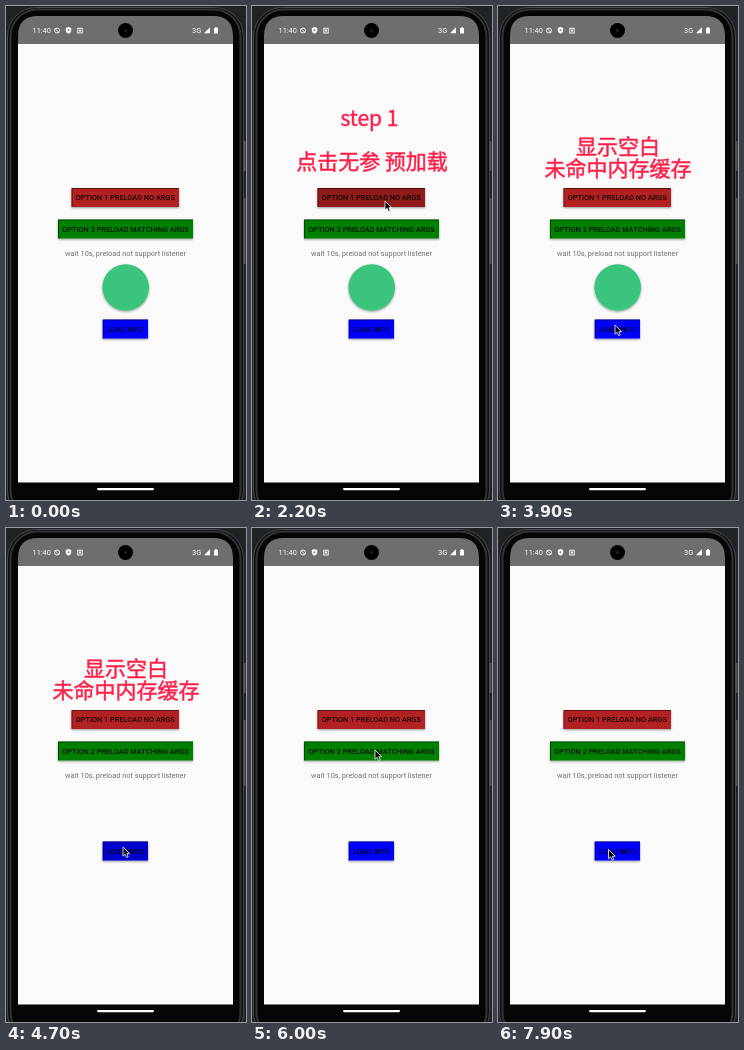
Recreate the animation shown at these times as an HTML page. Size 240 by 494 pixels, loop 8 s.

```html
<!DOCTYPE html>
<html lang="zh-CN">
<meta charset="utf-8">
<style>
html, body { margin: 0; width: 100%; height: 100%; overflow: hidden; background: #202326; }
svg { display: block; width: 240px; height: 494px; }
text { font: 7.35px Roboto, sans-serif; text-anchor: middle; }
.label { font-weight: 500; }
.caption text { font: 500 21px "Noto Sans CJK SC", "Noto Sans CJK", sans-serif; fill: #ff1f48; stroke: #ff1f48; stroke-width: .45; }
.status text { fill: #fff; text-anchor: start; }
</style>
<svg viewBox="0 0 240 494">
  <defs>
    <filter id="shadow" x="-20%" y="-30%" width="140%" height="180%">
      <feDropShadow dx="0" dy="1" stdDeviation=".8" flood-opacity=".4"/>
    </filter>
  </defs>

  <g id="phone">
    <rect x="1.5" y="1.5" width="236" height="512" rx="29" fill="#0b0c0d" stroke="#484b4d"/>
    <rect x="4.5" y="3.5" width="230" height="508" rx="27" fill="#050606" stroke="#303335" stroke-width="2"/>
    <path d="M238.5 135v30M238.5 192v66" stroke="#555" stroke-width="2"/>
    <path d="M12 38V30Q12 10 32 10H207Q227 10 227 30V38Z" fill="#6e6e6e"/>
    <rect x="12" y="38" width="215" height="438.5" fill="#fafafa"/>
    <rect x="91" y="482" width="57" height="2.2" rx="1.1" fill="#fff"/>
    <circle cx="119.5" cy="24.5" r="7.5" fill="#000"/>
    <circle cx="119.5" cy="24.5" r="1.5" fill="#17232b"/>
  </g>

  <g class="status">
    <text x="26.5" y="27.2">11:40</text>
    <text x="186" y="27.2">3G</text>
    <g fill="none" stroke="#fff" stroke-width=".9">
      <circle cx="51" cy="24.5" r="2.5"/>
      <path d="M49 22.5l4 4"/>
      <rect x="71.8" y="22.2" width="4.4" height="4.8"/>
    </g>
    <g fill="#fff">
      <path d="M62.5 21l2.7 1v2.5q0 2.3-2.7 3.3q-2.7-1-2.7-3.3V22Z"/>
      <circle cx="62.5" cy="24.2" r=".9" fill="#6e6e6e"/>
      <rect x="73" y="23.5" width="2" height="2"/>
      <path d="M204 21.3v6h-6Z"/>
      <path d="M208 22h1v-.8h2v.8h1v5.5h-4Z"/>
    </g>
  </g>

  <g id="buttons"></g>
  <text x="119.5" y="249.6" fill="#707070">wait 10s, preload not support listener</text>
  <circle id="picture" cx="119.7" cy="281.5" r="23.3" fill="#3ac47d" filter="url(#shadow)"/>
  <g id="captions"></g>
  <path id="cursor" d="M0 0V9.2L2.1 7.3 3.6 10.6 5.2 9.9 3.8 6.7H6.7Z" fill="#000" stroke="#fff" stroke-width=".8"/>
</svg>
<script>
const LOOP = 8000, STEP = 100;
const $ = id => document.getElementById(id);

function add(parent, tag, attrs, content = "") {
  const el = document.createElementNS("http://www.w3.org/2000/svg", tag);
  for (const key in attrs) el.setAttribute(key, attrs[key]);
  el.textContent = content;
  return parent.appendChild(el);
}

// x, y, width, height, colour, label, press time
const buttons = [
  [65.5, 182, 107.5, 19, "#b22222", "OPTION 1 PRELOAD NO ARGS", 2000],
  [52, 213.5, 135, 19, "#008000", "OPTION 2 PRELOAD MATCHING ARGS", 6900],
  [96.7, 313.5, 45.3, 19, "#0000ff", "LOAD INFO", 4400]
].map(([x, y, width, height, fill, label, press]) => {
  const g = add($("buttons"), "g", {});
  add(g, "rect", { x, y, width, height, fill, filter: "url(#shadow)" });
  add(g, "path", { d: `M${x + .5} ${y + height}V${y + .5}H${x + width}`, fill: "none", stroke: "#000", "stroke-opacity": .45 });
  const shade = add(g, "rect", { x, y, width, height });
  add(g, "text", { class: "label", x: x + width / 2, y: y + 12.2, fill: "#000", "fill-opacity": .87 }, label);
  return { shade, press };
});

// start, end, then lines of [text, baseline]
const captions = [
  [1000, 2800, ["step 1", 119.5], ["点击无参 预加载", 162.5]],
  [3700, 5500, ["显示空白", 148], ["未命中内存缓存", 170]],
  [6300, 7300, ["step 2", 121.5], ["点击有参数 预加载", 162.5]]
].map(([start, end, ...lines]) => {
  const g = add($("captions"), "g", { class: "caption" });
  lines.forEach(([line, y], i) =>
    add(g, "text", { x: y < 125 ? 117.5 : 120, y }, line));
  return { g, start, end };
});

// time, x, y
const path = [
  [200, 186, 307], [800, 133, 195], [2700, 133, 195], [3200, 119.7, 305],
  [3500, 117, 319], [5500, 117, 319], [6000, 123, 222], [7300, 123, 222],
  [7600, 116, 343], [7900, 110.5, 321.5]
];

const clamp = v => Math.max(0, Math.min(1, v));
const ease = v => v * v * (3 - 2 * v);
const show = (el, on) => el.setAttribute("visibility", on ? "visible" : "hidden");

function cursorAt(t) {
  const next = path.findIndex(p => p[0] > t);
  if (next < 0) return path.at(-1).slice(1);
  const [t0, x0, y0] = path[next - 1], [t1, x1, y1] = path[next];
  const k = ease((t - t0) / (t1 - t0));
  return [x0 + (x1 - x0) * k, y0 + (y1 - y0) * k];
}

function draw(now) {
  const t = Math.floor(now % LOOP / STEP) * STEP;
  show($("cursor"), t >= 200);
  if (t >= 200) $("cursor").setAttribute("transform", `translate(${cursorAt(t)})`);
  for (const { g, start, end } of captions) show(g, t >= start && t < end);
  for (const { shade, press } of buttons) {
    const age = t - press;
    shade.setAttribute("fill-opacity", .2 * clamp(age / 100) * clamp((600 - age) / 200));
  }
  show($("picture"), t < 4500);
  requestAnimationFrame(draw);
}
requestAnimationFrame(draw);
</script>
</html>
```
